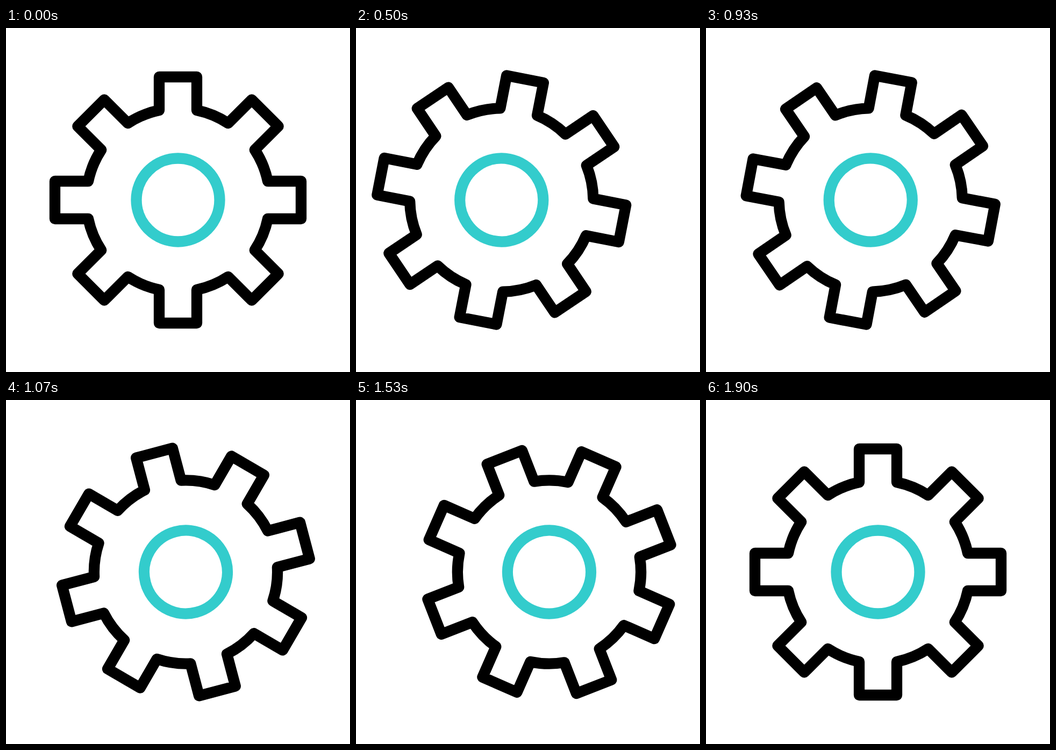
An HTML page that plays this animation: 640 px wide and 640 px high, repeating every 2000 ms.

```html
<!DOCTYPE html>
<html lang="en">
<head>
<meta charset="utf-8">
<title>Rolling gear</title>
<style>
  html, body { margin: 0; width: 100%; height: 100%; overflow: hidden; background: #fff; }
  svg { display: block; width: 100%; height: 100%; }
</style>
</head>
<body>
<svg viewBox="0 0 640 640" fill="none" stroke-width="20.3" stroke-linejoin="round">
  <g id="gear">
    <path id="teeth" stroke="#000"/>
    <circle r="77.5" stroke="#3cc"/>
  </g>
</svg>
<script>
const LOOP = 2000, FPS = 30;
const gear = document.getElementById('gear');

// Keys are [frame, value].
const shift = [[0, 0], [17, -51.2], [19.2, -51.2], [40.7, 51.2], [41.05, 51.2], [57, 0]];
const turn = [[0, 0], [8, -32.2], [23, -137.6], [32, -194.8], [40, -249.8], [46, -291.3], [57, -360]];

function teethPath() {
  const half = 35, tip = 229, root = 167, r = Math.hypot(half, root);
  let d = '';
  for (let i = 0; i < 8; i++) {
    const a = i * Math.PI / 4, c = Math.cos(a), s = Math.sin(a);
    const at = (x, y) => `${x * c - y * s} ${x * s + y * c}`;
    d += (i ? `A${r} ${r} 0 0 1 ` : 'M') + at(-half, -root) +
      `L${at(-half, -tip)}L${at(half, -tip)}L${at(half, -root)}`;
  }
  return d + `A${r} ${r} 0 0 1 ${-half} ${-root}Z`;
}

function segment(keys, f) {
  let i = 0;
  while (i < keys.length - 2 && f >= keys[i + 1][0]) i++;
  return i;
}

// Eases in and out of every key.
function eased(keys, f) {
  const i = segment(keys, f), [f0, v0] = keys[i], [f1, v1] = keys[i + 1];
  const x = (f - f0) / (f1 - f0);
  return v0 + (v1 - v0) * x * x * (3 - 2 * x);
}

// Passes through the keys without stopping.
function smooth(keys, f) {
  const last = keys.length - 1;
  const slope = i => (keys[i + 1][1] - keys[i][1]) / (keys[i + 1][0] - keys[i][0]);
  const speed = i => i === 0 ? -2 : i === last ? -5.8 : (slope(i - 1) + slope(i)) / 2;
  const i = segment(keys, f), [f0, v0] = keys[i], [f1, v1] = keys[i + 1];
  const n = f1 - f0, x = (f - f0) / n, y = 1 - x;
  return v0 * y * y * (1 + 2 * x) + v1 * x * x * (3 - 2 * x) +
    n * x * y * (speed(i) * y - speed(i + 1) * x);
}

let start;
function draw(now) {
  start ??= now;
  const t = (now - start) % LOOP;
  const f = Math.min(57, Math.floor((t + 3.4) * FPS / 1000));
  gear.setAttribute('transform', `translate(${320 + eased(shift, f)} 320) rotate(${smooth(turn, f)})`);
  requestAnimationFrame(draw);
}

document.getElementById('teeth').setAttribute('d', teethPath());
gear.setAttribute('transform', 'translate(320 320)');
requestAnimationFrame(draw);
</script>
</body>
</html>
```
